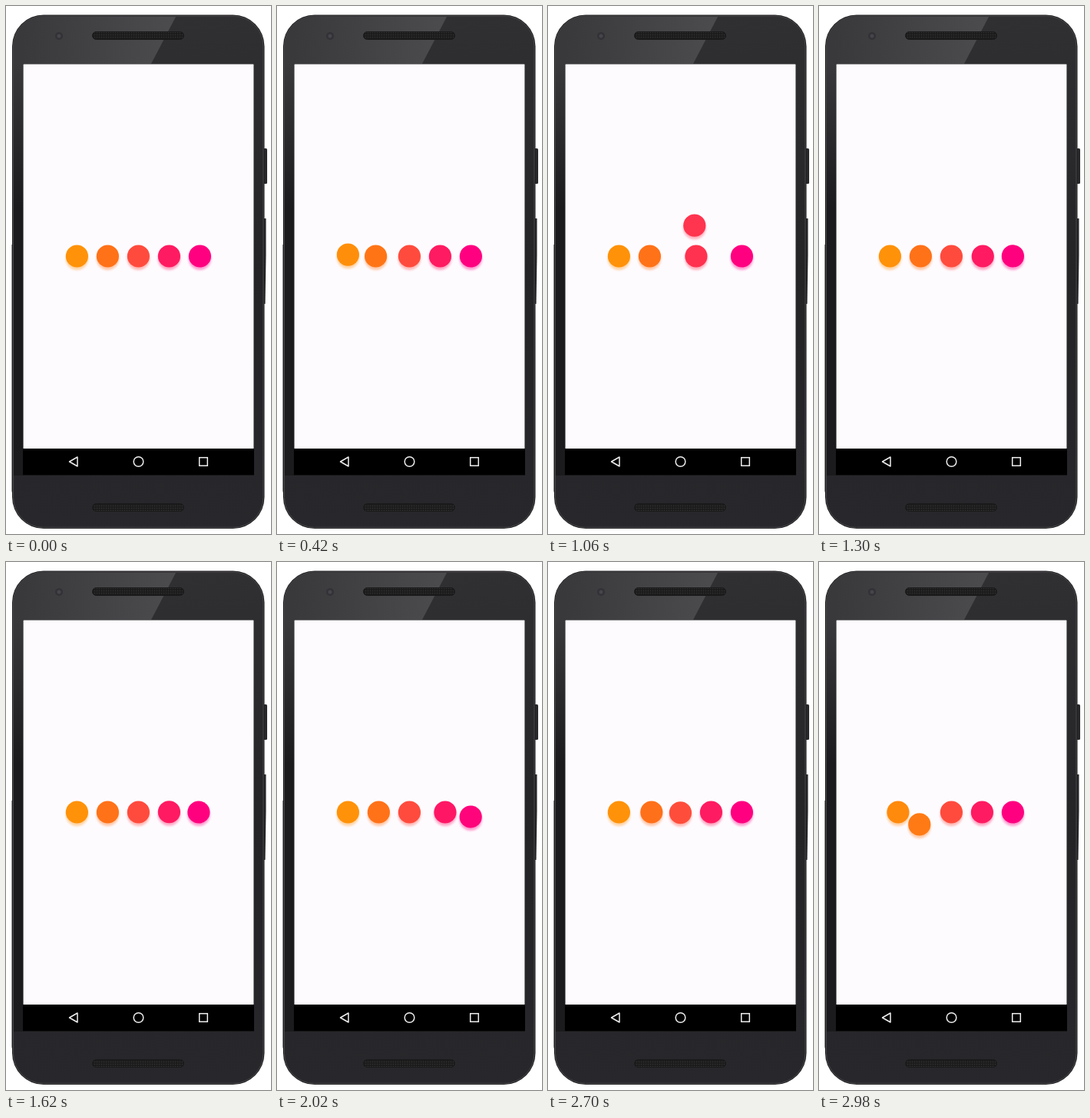
An HTML page that plays this animation: 345 by 686 pixels, repeating every 3.02 s.

```html
<!DOCTYPE html>
<html lang="en">
<head>
<meta charset="utf-8">
<title>Swapping dots loader</title>
<style>
  html, body { margin: 0; width: 100%; height: 100%; overflow: hidden; background: #fff; }
  svg { display: block; width: 345px; height: 686px; }
</style>
</head>
<body>
<svg viewBox="0 0 345 686" xmlns="http://www.w3.org/2000/svg">
  <defs>
    <linearGradient id="body" x1="0" y1="0" x2="0" y2="1">
      <stop offset="0" stop-color="#302f32"/>
      <stop offset=".5" stop-color="#242326"/>
      <stop offset="1" stop-color="#28272b"/>
    </linearGradient>
    <linearGradient id="shine" gradientUnits="userSpaceOnUse" x1="20" y1="40" x2="210" y2="40">
      <stop offset="0" stop-color="#39383a"/>
      <stop offset="1" stop-color="#4b4a4d"/>
    </linearGradient>
    <linearGradient id="side" x1="0" y1="0" x2="0" y2="1">
      <stop offset="0" stop-color="#39383a"/>
      <stop offset=".35" stop-color="#1b1a1d"/>
      <stop offset="1" stop-color="#1b1a1d"/>
    </linearGradient>
    <pattern id="mesh" width="3" height="3" patternUnits="userSpaceOnUse">
      <rect width="3" height="3" fill="#1b1b1c"/>
      <circle cx="1.5" cy="1.5" r=".8" fill="#333334"/>
    </pattern>
    <filter id="blur" x="-40%" y="-40%" width="180%" height="180%">
      <feGaussianBlur stdDeviation="1.8"/>
    </filter>
    <clipPath id="inside"><rect x="10" y="14" width="324.500" height="663" rx="38"/></clipPath>
  </defs>

  <g fill="#29282a">
    <rect x="334" y="185" width="6" height="46" rx="1.500"/>
    <path d="M334 276h4.500v47l-1 64h-3.500z"/>
    <path d="M9 310h-1.500v320l2 10z"/>
  </g>
  <rect x="8" y="11.500" width="328.500" height="667.500" rx="41" fill="#1b1a1c"/>
  <rect x="9.500" y="13" width="325.500" height="664.500" rx="39" fill="url(#body)" stroke="#4a494c"/>
  <g clip-path="url(#inside)">
    <path d="M10 14H221L189 75H10z" fill="url(#shine)"/>
    <rect x="10" y="75" width="12" height="535" fill="url(#side)"/>
  </g>
  <circle cx="69" cy="39" r="5" fill="#333236"/>
  <circle cx="69" cy="39" r="2.500" fill="#46454b"/>
  <g fill="url(#mesh)" stroke="#19191a">
    <rect x="112.500" y="33.500" width="119" height="10" rx="5"/>
    <rect x="112.500" y="646.500" width="119" height="10" rx="5"/>
  </g>

  <rect x="22" y="75" width="301" height="534.500" fill="#000"/>
  <rect x="22.500" y="75.500" width="300" height="499.500" fill="#fefbff"/>
  <g fill="none" stroke="#eee" stroke-width="1.500">
    <path d="M82.500 592L93 586V598z" stroke-linejoin="round"/>
    <circle cx="172.500" cy="592" r="6.300"/>
    <rect x="251.700" y="586.700" width="10.600" height="10.600"/>
  </g>
  <g id="dots"></g>
</svg>
<script>
const LOOP = 3020, FIRST_HOLD = 100, STEP = 40;
const LEFT = 92.4, GAP = 40, BASE = 325, LIFT = 40, RADIUS = 14.6;
const COLORS = [[255, 146, 8], [255, 114, 24], [255, 75, 61], [255, 27, 97], [255, 0, 128]];

// Pacing as [ms, swaps completed]; the slider travels right, then back left.
const OUTWARD = [[80, 0], [700, 1.46], [1060, 2.508], [1620, 3.876], [1720, 4]];
const RETURN = [[1780, 0], [2020, .735], [2460, 2.144], [2980, 3.657]];

const svgNode = (name, attrs, parent) => {
  const node = document.createElementNS('http://www.w3.org/2000/svg', name);
  for (const key in attrs) node.setAttribute(key, attrs[key]);
  return parent.appendChild(node);
};

const layer = document.getElementById('dots');
const dots = COLORS.map(() => {
  const group = svgNode('g', {}, layer);
  svgNode('circle', { cy: 3.5, r: RADIUS, opacity: .38, filter: 'url(#blur)' }, group);
  svgNode('circle', { r: RADIUS }, group);
  return group;
});

const mix = (a, b, f) => a + (b - a) * f;
const slotX = slot => LEFT + slot * GAP;

function colorAt(slot) {
  const i = Math.min(3, Math.floor(slot));
  return `rgb(${COLORS[i].map((c, n) => Math.round(mix(c, COLORS[i + 1][n], slot - i)))})`;
}

function paced(points, t) {
  if (t <= points[0][0]) return points[0][1];
  for (let i = 1; i < points.length; i++) {
    const [t0, v0] = points[i - 1], [t1, v1] = points[i];
    if (t <= t1) return mix(v0, v1, (t - t0) / (t1 - t0));
  }
  return points[points.length - 1][1];
}

const slideEase = u => (1 - Math.cos(Math.PI * u)) / 2;
const hopEase = q => q < .5 ? (2 * q) ** 2.1 / 2 : 1 - (2 - 2 * q) ** 2.1 / 2;

function place(dot, x, y, slot) {
  dot.setAttribute('transform', `translate(${x.toFixed(2)} ${y.toFixed(2)})`);
  dot.setAttribute('fill', colorAt(slot));
}

function render(ms) {
  const t = ms < FIRST_HOLD ? 0 : FIRST_HOLD + Math.floor((ms - FIRST_HOLD) / STEP) * STEP;
  const back = t >= RETURN[0][0];
  const progress = paced(back ? RETURN : OUTWARD, t);
  const swap = Math.min(3, Math.floor(progress));
  const slide = slideEase(progress - swap);
  const angle = Math.PI * hopEase(slide);
  const dir = back ? -1 : 1;
  const from = back ? 4 - swap : swap;
  const to = from + dir;

  const middle = slotX((from + to) / 2);
  place(dots[from], slotX(from + dir * slide), BASE, from + dir * slide);
  place(dots[to], middle + dir * GAP / 2 * Math.cos(angle),
    BASE - dir * LIFT * Math.sin(angle), to - dir * slide);
  dots.forEach((dot, i) => {
    if (i !== from && i !== to) place(dot, slotX(i), BASE, i);
  });
}

const start = performance.now();
function tick() {
  render((performance.now() - start) % LOOP);
  requestAnimationFrame(tick);
}
tick();
</script>
</body>
</html>
```
